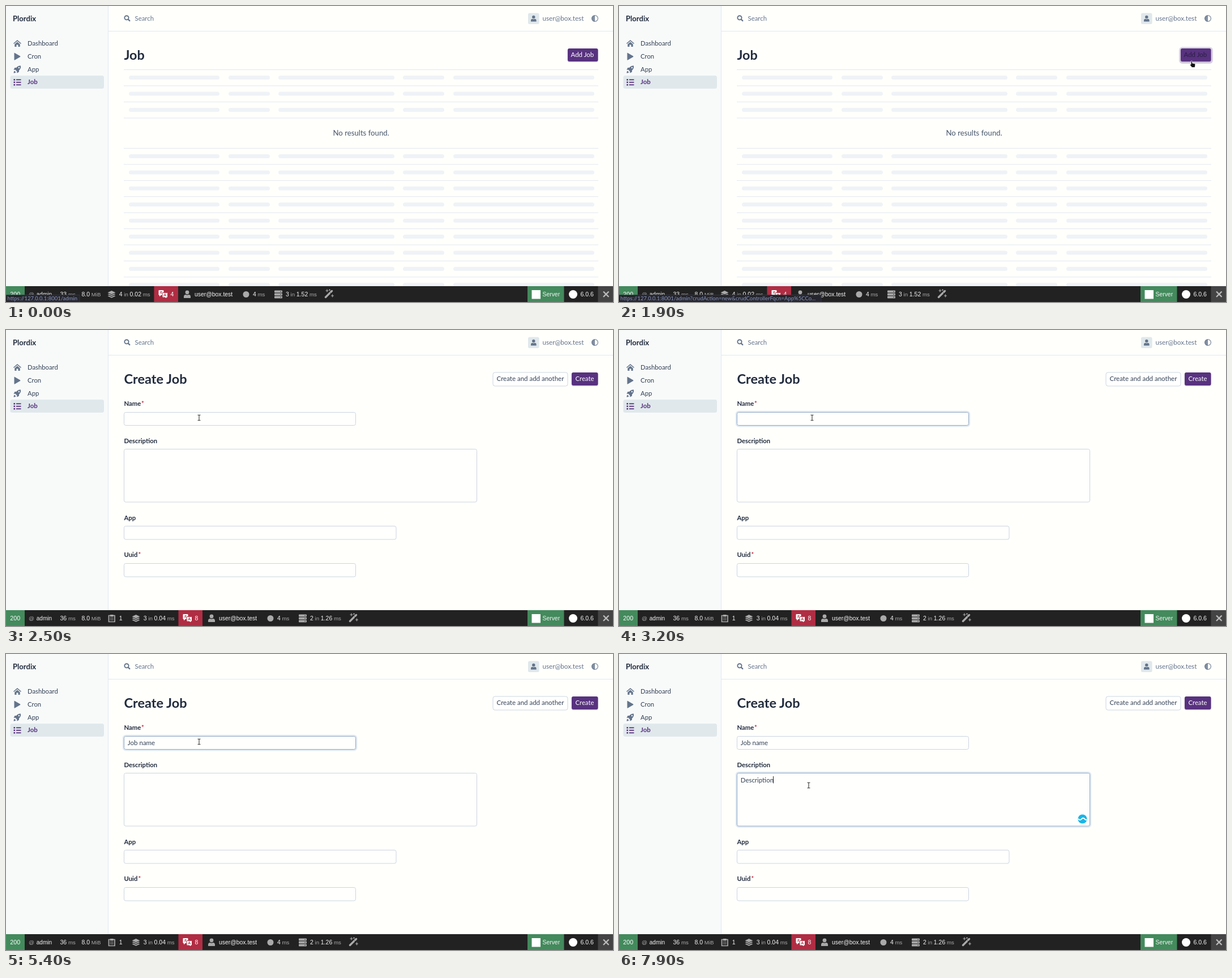
An HTML page that plays this animation: 1072x523 px, repeating every 8000 ms.

```html
<!DOCTYPE html>
<html lang="en">
<head>
<meta charset="utf-8">
<title>Job admin</title>
<style>
  html, body { margin: 0; width: 100%; height: 100%; overflow: hidden; background: #fffffc; }
  svg { display: block; width: 100vw; height: 100vh; }
  text { font-family: Lato, "Open Sans", sans-serif; white-space: pre; }
  .bar text { font-family: "Liberation Sans", Arial, sans-serif; }
  .b { font-weight: 700; }
</style>
</head>
<body>
<svg id="stage" viewBox="0 0 1072 523"></svg>
<script>
const LOOP = 8000, STEP = 100;
const INK = '#334155', DARK = '#212b3d', SLATE = '#64748b', LINE = '#e2e8f0';
const PURPLE = '#58327f', GREY = '#aaa', LIGHT = '#f5f5f5', PAGE = '#fffffc';
const EMAIL = 'user@box.test';
const URL_BASE = 'https://127.0.0.1:8001/admin';
const URL_NEW = URL_BASE + '?crudAction=new&amp;crudControllerFqcn=App%5CCo…';

const rect = (x, y, w, h, fill, more = '') =>
  `<rect x="${x}" y="${y}" width="${w}" height="${h}" fill="${fill}" ${more}/>`;
const text = (x, y, s, size = 11.3, fill = INK, more = '') =>
  `<text x="${x}" y="${y}" font-size="${size}" fill="${fill}" ${more}>${s}</text>`;
const path = (d, fill, more = '') => `<path d="${d}" fill="${fill}" ${more}/>`;
const stroke = (d, color, width, more = '') =>
  path(d, 'none', `stroke="${color}" stroke-width="${width}" ${more}`);
const at = (x, y, s, more = '') => `<g transform="translate(${x} ${y})" ${more}>${s}</g>`;
const person = (fill) =>
  `<circle cx="6" cy="3.5" r="3.4" fill="${fill}"/>` +
  path('M0 13.5v-2.500q0-3.500 3.500-3.500q2.500 1.300 5 0q3.500 0 3.500 3.500v2.500z', fill);

function sidebar() {
  const home = path('M0 6.500L7 0.500L14 6.500L13 7.600L7 2.500L1 7.600zM2.300 8L7 4l4.700 4v4.500h-3.200v-3.500h-3v3.500h-3.200z', SLATE);
  const play = path('M0.500 0.500Q0.500-0.500 1.500 0L11 5.600Q12 6.300 11 7L1.500 12.600Q0.500 13 0.500 12z', SLATE);
  const rocket = path('M12.500 0Q7.500-0.500 4.800 3.500H2L0 7.200H3L5.800 10V13L9.500 11V8.200Q13.300 5 12.500 0zM1.500 9Q0 10 0 13Q3 13 4 11.500z', SLATE) +
    `<circle cx="9.400" cy="3.500" r="1.200" fill="#f8fafa"/>`;
  const list = [0, 4.5, 9].map(y => rect(0, y, 2.6, 2.6, PURPLE) + rect(4.5, y + 0.4, 8.5, 1.8, PURPLE)).join('');
  return rect(0, 0, 180, 523, '#f8fafa') + rect(180, 0, 1, 523, LINE) +
    rect(7.5, 123, 165.5, 23, '#e0e8ec', 'rx="3.500"') +
    text(12, 27, 'Plordix', 13.1, DARK, 'class="b"') +
    at(13, 59.5, home) + at(14, 83, play) + at(13.5, 105.5, rocket) + at(13.5, 129, list) +
    text(38, 69.8, 'Dashboard') + text(38, 93, 'Cron') + text(38, 116, 'App') +
    text(38, 138.3, 'Job', 11.5, PURPLE, 'class="b"');
}

function header() {
  return rect(181, 44, 891, 1, LINE) +
    `<circle cx="213" cy="20.800" r="3.600" fill="none" stroke="${SLATE}" stroke-width="1.900"/>` +
    stroke('M215.800 23.600L219 26.800', SLATE, 2.2) +
    text(227.5, 26, 'Search', 11.4, SLATE) +
    rect(922, 12.5, 19.5, 19.5, '#e0e8ec', 'rx="2.500"') +
    at(927, 16.7, `<g transform="scale(.8)">${person(SLATE)}</g>`) +
    text(947.5, 26, EMAIL, 11.7, SLATE) +
    `<circle cx="1040" cy="22" r="5.400" fill="none" stroke="${SLATE}" stroke-width="1.300" opacity=".8"/>` +
    path('M1040 16.500a5.500 5.500 0 0 0 0 11z', SLATE, 'opacity=".8"');
}

const button = (x, w, label, tx, size) =>
  rect(x - 0.5, 75, w + 1, 24.5, '#312050', 'rx="4" opacity=".18"') +
  rect(x, 75, w, 23, PURPLE, 'rx="3"') + text(tx, 90, label, size, '#fff');

function listPage() {
  const cols = [[217, 160], [393, 73], [481, 205], [701, 73], [790, 249]];
  const line = y => rect(208, y, 838, 1, LINE);
  const row = y => line(y) + cols.map(([x, w]) => rect(x, y + 11, w, 7, '#eff3f7', 'rx="3.500"')).join('');
  let s = text(208.5, 95, 'Job', 23.3, DARK, 'class="b"');
  for (let i = 0; i < 3; i++) s += row(112 + i * 28.5);
  s += line(197.5);
  for (let i = 0; i < 9; i++) s += row(251 + i * 28.42);
  return s + text(577.5, 229, 'No results found.', 13.2, '#475569') +
    rect(989, 72.5, 60, 29.5, PURPLE, 'id="glow" rx="6" opacity="0"') +
    `<g id="add">${button(992, 53.5, 'Add Job', 997.5, 11.5)}</g>`;
}

const BOXES = { name: [208.5, 145.5, 409, 23], desc: [208.5, 210.5, 623, 93.5],
  app: [208.5, 346.5, 480.5, 23.500], uuid: [208.5, 412.5, 409, 23.500] };

function formPage() {
  const box = id => {
    const [x, y, w, h] = BOXES[id];
    return rect(x - 1.5, y - 1.5, w + 3, h + 3, 'none', `id="${id}Ring" rx="4.500" stroke="#e0e9f2" stroke-width="2.500"`) +
      rect(x, y, w, h, '#fffffd', `id="${id}Box" rx="3" stroke="#cbd5e1"`);
  };
  const label = (y, s, star) => text(208.5, y, s, 11.3, DARK, 'class="b"') +
    (star ? text(star, y, '*', 11, '#c8283c', 'class="b"') : '');
  return text(208.5, 95, 'Create Job', 23.5, DARK, 'class="b"') +
    rect(860, 75, 132, 24, '#fff', 'rx="3.500" stroke="#cbd5e1"') +
    text(866.5, 90, 'Create and add another', 11.5) + button(999, 46.5, 'Create', 1005.5, 11.3) +
    label(134, 'Name', 239) + label(199.7, 'Description') + label(335.5, 'App') + label(401, 'Uuid', 233.5) +
    Object.keys(BOXES).map(box).join('') +
    text(214.8, 160.7, '', 11.55, INK, 'id="nameText"') + text(214.8, 226.5, '', 11.45, INK, 'id="descText"') +
    rect(0, 0, 1, 12.5, '#222', 'id="caret"') +
    `<g id="badge"><circle cx="818.500" cy="291.500" r="8" fill="#19b5e8"/>` +
    stroke('M815 291.800l2.500 2.500 4.800-5', '#fff', 1.9, 'id="tick"') +
    stroke('', '#fff', 2, 'id="wave"') + '</g>';
}

// Segments alternate between value and unit.
const stat = (x, ...parts) => text(x, 513, parts.map((p, i) =>
  `<tspan fill="${i % 2 ? GREY : LIGHT}" font-size="${i % 2 ? 9.7 : 10.5}">${p}</tspan>`).join(''));

function toolbar(form) {
  const dx = form ? 43 : 0;
  const layers = path('M0 3.800L7 0.500L14 3.800L7 7.100z', GREY) +
    path('M0 6.800l2.300-1 4.700 2.300 4.700-2.300 2.300 1L7 10.100zM0 10l2.300-1 4.700 2.300 4.700-2.300 2.300 1L7 13.300z', GREY);
  const speech = path('M1 0H8Q9 0 9 1V8Q9 9 8 9H4L1.500 11.500V9H1Q0 9 0 8V1Q0 0 1 0z', '#fff') +
    path('M7.500 4.500H15Q16 4.500 16 5.500V12Q16 13 15 13H14V15.500L11.500 13H7.500Q6.500 13 6.500 12V5.500Q6.500 4.500 7.500 4.500z', '#fff', 'stroke="#b02d43"') +
    stroke('M2.500 3H6.500M4.500 2V3.500L2.500 6.500M4 4.500L6 6.500M9 11l2.200-5 2.200 5M10 9.500h2.600', '#b02d43', 0.9);
  const stack = [0, 5, 10].map(y => rect(0, y, 14, 4, GREY, 'rx="1"') + rect(10.5, y + 1.5, 1.5, 1, '#222')).join('');
  const wand = stroke('M1 14L12 3', GREY, 3.4, 'stroke-linecap="round"') + stroke('M9 6l1.500 1.500', '#222', 1) +
    stroke('M3.500 0v5M1 2.500h5M13 9v5M10.500 11.500h5M8 0v2.500M6.800 1.200h2.500', GREY, 1.2);
  const clip = stroke('M3 2H1V13H11.500V2H9.500', GREY, 1.7) + rect(3, 0.5, 6.5, 3.5, GREY, 'rx="1"') +
    stroke('M3 6.500h6.500M3 9.500h6.500', GREY, 1.2);
  return rect(0, 495, 1072, 28, '#222') + rect(0, 495, 33, 28, '#438a5c') +
    text(7.3, 513, '200', 10.7, '#fff') + text(40, 513, '@', 9.7, GREY) + text(53.8, 513, 'admin', 10, LIGHT) +
    stat(95.5, form ? '36' : '33', ' ms') + stat(133.5, '8.0', ' MiB') +
    (form ? at(180.5, 502.5, clip) + stat(199.8, '1') : '') +
    at(dx, 0,
      at(179.5, 502.5, layers) + stat(199.8, form ? '3' : '4', ' in ', form ? '0.04' : '0.02', ' ms') +
      rect(261.5, 495, 42.500, 28, '#b02d43') + at(269.5, 502, speech) + text(290.5, 513, form ? '8' : '4', 10.5, '#fff') +
      at(314, 502.5, person(GREY)) + text(333, 513, EMAIL, 10.4, LIGHT) +
      `<circle cx="424" cy="509.500" r="5.500" fill="${GREY}"/>` + stat(436, '4', ' ms') +
      at(474, 502.5, stack) + stat(494, form ? '2' : '3', ' in ', form ? '1.26' : '1.52', ' ms') +
      at(563.5, 500.5, wand)) +
    rect(921, 495, 64.5, 28, '#438a5c') + rect(928.5, 502, 15.5, 15.5, '#fff') + text(947.5, 513, 'Server', 10.4, LIGHT) +
    `<circle cx="1001.500" cy="509.500" r="7.500" fill="#fff"/>` + text(1014.5, 513, '6.0.6', 10.5, LIGHT) +
    rect(1045.5, 495, 26.5, 28, '#444') + stroke('M1055 504.500l9.500 9.500m0-9.500l-9.500 9.500', '#bbb', 2.3);
}

const group = (id, s) => `<g id="${id}">${s}</g>`;
const status = (id, w, s) => group(id, rect(0, 510.5, w, 12.5, '#25262e') +
  stroke(`M0 510.500H${w}V523`, '#3a3c46', 0.7) + text(2.5, 520, s, 9.5, '#8a96c0'));
const cursors =
  group('arrow', path('M0 0V11L2.600 8.600L4.300 12.300L6 11.500L4.300 8H7.800z', '#111', 'stroke="#fff" stroke-width=".8"')) +
  group('hand', path('M0.300 0.300Q1.500-0.700 2.400 0.500V4L6.800 5Q8 5.500 7.800 7L7 11.500H1.800L-1.800 7Q-1.800 5.500 0 6.300z', '#111', 'stroke="#fff" stroke-width=".7"')) +
  group('beam', stroke('M-2.500-4.700H-.6Q0-4.700 0-4V4Q0 4.700-.6 4.700H-2.500M2.500-4.700H.6Q0-4.700 0-4M0 4Q0 4.700.6 4.700H2.500', '#333', 1.1));

const stage = document.getElementById('stage');
stage.innerHTML = rect(0, 0, 1072, 523, PAGE) +
  group('list', listPage() + at(0, 0, toolbar(false), 'class="bar"')) +
  group('form', formPage() + at(0, 0, toolbar(true), 'class="bar"')) +
  sidebarClip() + header() +
  status('urlBase', 130, URL_BASE) + status('urlNew', 357, URL_NEW) + group('mouse', cursors);

function sidebarClip() {
  return `<clipPath id="above"><rect width="181" height="495"/></clipPath><g clip-path="url(#above)">${sidebar()}</g>`;
}

const $ = id => document.getElementById(id);
const show = (id, on) => $(id).setAttribute('display', on ? 'inline' : 'none');
const between = (t, a, b) => t >= a && t < b;
const smooth = k => k * k * (3 - 2 * k);

// Pointer stops: time, x, y.
const ROUTE = [[500, 62, 138], [1300, 1011, 103], [1600, 1010, 97], [2000, 1010, 97],
  [2200, 408, 124], [2300, 341, 155], [5500, 341, 155], [5900, 335, 232], [8000, 335, 232]];
const NAME_KEYS = [3500, 3700, 4000, 4200, 4400, 4500, 4700, 4800];
const DESC_KEYS = [6700, 6700, 6900, 7100, 7200, 7300, 7500, 7600, 7700, 7800, 7900];
const typed = (word, keys, t) => word.slice(0, keys.filter(k => k <= t).length);

function pointer(t) {
  const i = Math.max(1, ROUTE.findIndex(p => p[0] > t));
  const [a, b] = [ROUTE[i - 1], ROUTE[i]];
  const k = smooth((t - a[0]) / (b[0] - a[0]));
  return [a[1] + (b[1] - a[1]) * k, a[2] + (b[2] - a[2]) * k];
}

function focus(id, on) {
  show(id + 'Ring', on);
  $(id + 'Box').setAttribute('stroke', on ? '#93a9c4' : '#cbd5e1');
}

function draw(t) {
  const form = t >= 2000, hover = between(t, 1400, 2000);
  show('list', !form);
  show('form', form);
  show('urlBase', t < 500);
  show('urlNew', between(t, 1400, 2300));

  $('glow').setAttribute('opacity', hover ? 0.22 : 0);
  $('add').lastElementChild.setAttribute('fill', between(t, 1900, 2000) ? '#2b1f45' : '#fff');

  const inName = between(t, 2800, 5900), inDesc = t >= 5900;
  focus('name', inName);
  focus('desc', inDesc);
  focus('app', false);
  focus('uuid', false);
  $('nameText').textContent = typed('Job name', NAME_KEYS, t);
  $('descText').textContent = typed('Description', DESC_KEYS, t);

  const blink = between(t, 3200, 3500) || between(t, 5400, 5900) || between(t, 6400, 6700);
  show('caret', (inName || inDesc) && !blink);
  const field = $(inDesc ? 'descText' : 'nameText');
  if (form) {
    const len = field.textContent ? field.getComputedTextLength() : 0;
    $('caret').setAttribute('x', Math.round(214 + len));
    $('caret').setAttribute('y', inDesc ? 216 : 150.3);
  }

  const busy = t >= 6900;
  show('badge', t >= 6000);
  show('tick', !busy);
  show('wave', busy);
  let d = '';
  for (let x = -7.5; x <= 7.5; x += 0.5) {
    const y = -1.6 * Math.sin((x + (7900 - t) / 50) * Math.PI / 5.5 + 0.9);
    d += `${d ? 'L' : 'M'}${818.5 + x} ${(291.5 + y).toFixed(2)}`;
  }
  $('wave').setAttribute('d', d);

  const [x, y] = pointer(t);
  show('mouse', t >= 500);
  $('mouse').setAttribute('transform', `translate(${x.toFixed(1)} ${y.toFixed(1)})`);
  const hand = between(t, 1400, 2100), beam = t >= 2300;
  show('hand', hand);
  show('beam', beam);
  show('arrow', !hand && !beam);
}

const start = performance.now();
function tick() {
  const t = (performance.now() - start) % LOOP;
  draw(Math.floor(t / STEP) * STEP);
  requestAnimationFrame(tick);
}
tick();
</script>
</body>
</html>
```
